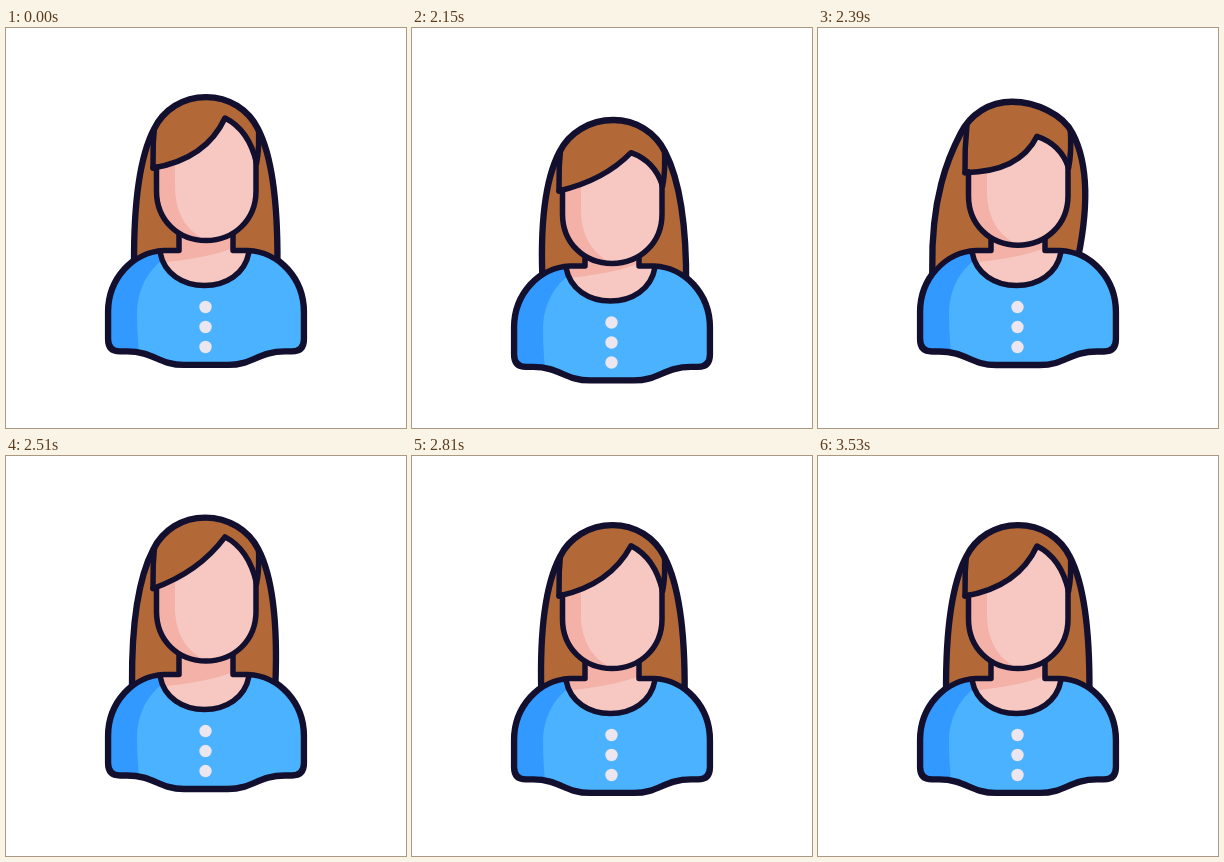
These frames come from a looping animation (400 by 400 pixels, 3.92 s). An HTML page with a canvas:

```html
<!DOCTYPE html>
<html lang="en">
<head>
<meta charset="utf-8">
<title>Nodding avatar</title>
<style>
  html, body { margin: 0; width: 100%; height: 100%; overflow: hidden; background: #fff; }
  canvas { display: block; width: 100vmin; height: 100vmin; }
</style>
</head>
<body>
<canvas width="400" height="400"></canvas>
<script>
const ctx = document.querySelector('canvas').getContext('2d');
const LOOP = 3920, START = 2030, END = 3530, STEP = 30;
const LINE = 5.5, OUTER_LINE = 7.2;
const INK = '#130f2e', HAIR = '#b26937', SKIN = '#f6c8c1', SHADE = '#f4b1a8',
      SHIRT = '#4bb2ff', SHIRT_DARK = '#3199ff', BUTTON = '#ebe6f0';

// Each track is a list of [time, value], eased in and out between keys.
const tracks = {
  body: [[2000, 0], [2150, 15.5], [2490, -4], [2810, 0]],
  head: [[2030, 0], [2200, 29], [2510, -7.5], [2780, 0]],
  tip:  [[2030, 0], [2270, 23.5], [2570, -4.5], [2850, 0]],
  bow:  [[2030, 1], [2260, .13], [2400, 1.1], [2630, 0], [2860, 1]],
  sway: [[2000, 0], [2110, 4], [2360, -14.5], [2640, 8], [2970, -5], [3260, 2], [3500, 0]]
};

function valueAt(keys, t) {
  const i = keys.findIndex(k => k[0] > t);
  if (i === 0) return keys[0][1];
  if (i < 0) return keys[keys.length - 1][1];
  const [t0, a] = keys[i - 1], [t1, b] = keys[i];
  const u = (t - t0) / (t1 - t0);
  return a + (b - a) * u * u * (3 - 2 * u);
}

function fill(path, color) {
  ctx.fillStyle = color;
  ctx.fill(path);
}

function stroke(path, width = LINE) {
  ctx.lineWidth = width;
  ctx.stroke(path);
}

function shifted(dy, draw) {
  ctx.save();
  ctx.translate(0, dy);
  draw();
  ctx.restore();
}

function clipped(path, draw) {
  ctx.save();
  ctx.clip(path);
  draw();
  ctx.restore();
}

const torso = new Path2D(`M173 222.5 H158 C127 224 102.5 251 102.5 284 V311
  Q102.5 323 114 323 H121 C148 323 153 336.5 178 336.5 H222 C247 336.5 252 323 279 323
  H286 Q297.5 323 297.5 311 V284 C297.5 251 273 224 242 222.5 H227 V195 H173 Z`);
const sleeveShade = new Path2D('M90 215 H163 V228 C148 236 131 255 131 287 Q131 308 134 335 H90 Z');
const neck = new Path2D(`M173 195 V222.5 H154 C158 246 177 257.5 198.5 257.5
  C220 257.5 239 246 243 222.5 H227 V195 Z`);
const neckShade = new Path2D('M150 195 H227 V220 Q205 229 161 234 L150 222 Z');
const neckline = new Path2D('M154 224 C158 246 177 257.5 198.5 257.5 C220 257.5 239 246 243 224');
const faceShade = new Path2D('M140 80 H169 V158 C169 186 181 204 202 213 H140 Z');
const glints = new Path2D(`M190 89 Q199 82 212 84 L216 89 Q203 87 190 89 Z
  M174 126 L187 113 L207 110 L198 122 Z M220 90 Q232 93 241 104 L242 117 L234 108 Z`);

function drawBody() {
  fill(torso, SHIRT);
  clipped(torso, () => fill(sleeveShade, SHIRT_DARK));
  fill(neck, SKIN);
  clipped(neck, () => fill(neckShade, SHADE));
  stroke(neckline);
  stroke(torso);
  ctx.fillStyle = BUTTON;
  for (const y of [279, 299, 319]) {
    ctx.beginPath();
    ctx.arc(199.5, y, 6.2, 0, 7);
    ctx.fill();
  }
}

// The hair swings from its tips and puffs out on both sides while it does.
function hairPath(sway) {
  const apex = .42 * sway, puff = Math.abs(sway);
  const sideL = .1 * sway - .3 * puff, sideR = .1 * sway + .3 * puff;
  const midL = .45 * sway - .6 * puff, midR = .45 * sway + .6 * puff;
  return new Path2D(`M${128.5 + sway} 236 V255 H${271 + sway} V236
    C${271.5 + midR} 165 ${264 + sideR} 125 ${251.5 + sideR} 101
    C${242 + sideR} 82 ${223 + apex} 69.5 ${200 + apex} 69.5
    C${177 + apex} 69.5 ${158 + sideL} 82 ${148.5 + sideL} 101
    C${136 + sideL} 125 ${128 + midL} 165 ${128.5 + sway} 236 Z`);
}

function drawFace(hair, tip, bow, glint) {
  const tipY = 90 + tip;
  const fringe = `M147 140 Q${183 + 17 * bow} ${(140 + tipY) / 2 + 16 * bow} 219 ${tipY}
    Q243 ${102 + .72 * tip} 250.5 135`;
  const face = new Path2D(fringe +
    'L250 163 C250 192 228 212.5 200 212.5 C172 212.5 150.5 192 150.5 163 V139 Z');
  const jaw = new Path2D('M150.5 139 V163 C150.5 192 172 212.5 200 212.5 C228 212.5 250 192 250 163 V134');
  const locks = new Path2D('M149 92 Q146.5 116 147 140 M252 92 Q254 120 250.5 135');
  fill(face, SKIN);
  clipped(face, () => fill(faceShade, SHADE));
  if (glint) fill(glints, SKIN);
  stroke(jaw);
  stroke(new Path2D(fringe));
  clipped(hair, () => stroke(locks));
}

function render(time) {
  const t = time < START ? 0 : Math.min(END, START + STEP * Math.floor((time - START) / STEP));
  const pose = {};
  for (const name in tracks) pose[name] = valueAt(tracks[name], t);
  const hair = hairPath(pose.sway);

  ctx.fillStyle = '#fff';
  ctx.fillRect(0, 0, 400, 400);
  ctx.strokeStyle = INK;
  ctx.lineJoin = ctx.lineCap = 'round';

  shifted(pose.body, () => stroke(torso, OUTER_LINE));
  shifted(pose.head, () => {
    stroke(hair, OUTER_LINE);
    fill(hair, HAIR);
    stroke(hair);
  });
  shifted(pose.body, drawBody);
  shifted(pose.head, () => drawFace(hair, pose.tip, pose.bow, t === START));
}

const begin = performance.now();
function tick() {
  render((performance.now() - begin) % LOOP);
  requestAnimationFrame(tick);
}
tick();
</script>
</body>
</html>
```
